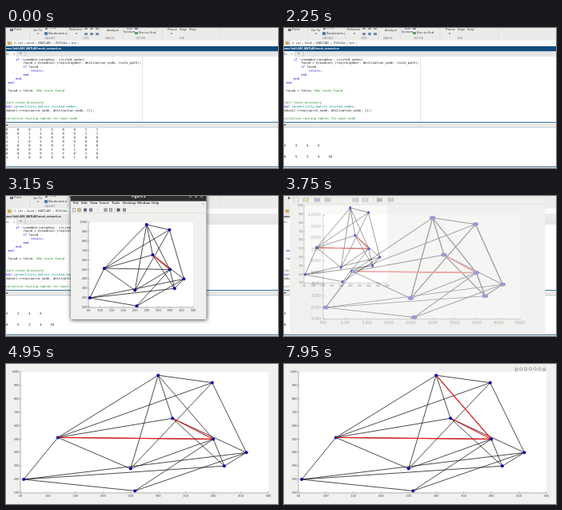
An HTML page with a canvas that plays this animation: 340x176 px, repeating every 8000 ms.

```html
<!DOCTYPE html>
<html lang="en">
<head>
<meta charset="utf-8">
<title>Mesh network plot</title>
<style>
html, body { margin: 0; width: 100%; height: 100%; overflow: hidden; background: #fff; }
canvas { display: block; width: 340px; height: 176px; }
</style>
</head>
<body>
<canvas id="stage"></canvas>
<script>
const LOOP = 8000;
const ratio = window.devicePixelRatio || 1;
const canvas = document.getElementById('stage');
const layer = document.createElement('canvas');
for (const c of [canvas, layer]) {
  c.width = 340 * ratio;
  c.height = 176 * ratio;
}
const stage = canvas.getContext('2d');
let ctx = stage;

const SANS = '"Open Sans", "Noto Sans", sans-serif';
const PLOT = '"Liberation Sans", Arial, sans-serif';
const MONO = '"DejaVu Sans Mono", monospace';

const nodes = {
  A: [118, 512], B: [300, 975], C: [398, 920], D: [326, 655], E: [400, 500],
  F: [460, 400], G: [420, 300], H: [250, 280], I: [56, 200], J: [258, 115]
};
const links = 'AB AC AD AE AH AI BC BD BE BH CF CH DF DG EG EH EJ FG FI FJ GI IJ'.split(' ');

// Moments of change, in ms
const at = { cleared: 450, result: 2000, figure: 2400, firstHop: 2900, secondHop: 3350,
  grow: 3650, grown: 3900, tools: 7000, thirdHop: 7250 };

const small = { x: 81, y: -4, w: 169.5, h: 159 };
const large = { x: -33, y: -31, w: 401, h: 214 };
const mix = (a, b, p) => a + (b - a) * p;

function rect(x, y, w, h, color) {
  ctx.fillStyle = color;
  ctx.fillRect(x, y, w, h);
}

function text(str, x, y, { size = 4, color = '#333', font = SANS, align = 'left', weight = '' } = {}) {
  ctx.font = `${weight} ${size}px ${font}`;
  ctx.fillStyle = color;
  ctx.textAlign = align;
  ctx.textBaseline = 'middle';
  ctx.fillText(str, x, y);
}

function line(x1, y1, x2, y2, color, width = 0.7) {
  ctx.strokeStyle = color;
  ctx.lineWidth = width;
  ctx.beginPath();
  ctx.moveTo(x1, y1);
  ctx.lineTo(x2, y2);
  ctx.stroke();
}

function dot(x, y, r, color) {
  ctx.fillStyle = color;
  ctx.beginPath();
  ctx.arc(x, y, r, 0, 7);
  ctx.fill();
}

function drawRibbon() {
  rect(0, 0, 340, 15, '#ebebea');
  const items = [['Print', 10, 2], ['Go To', 34, 2.5], ['Find', 54, -0.5], ['Bookmark', 53, 6.5],
    ['Refactor', 79, 1.5], ['Analyze', 126, 2.5], ['Run', 151, 1], ['Section', 147, 5],
    ['Run to End', 166, 6], ['Pause', 202, 1.5], ['Stop', 217, 1.5], ['Step', 229, 1.5]];
  for (const [label, x, y] of items) text(label, x, y, { size: 4.2 });
  const groups = [['NAVIGATE', 55], ['CODE', 100], ['ANALYZE', 130], ['SECTION', 168], ['RUN', 220]];
  for (const [label, x] of groups) text(label, x, 13, { size: 2.8, color: '#777', align: 'center' });
  for (const x of [30, 77, 118, 146, 195, 268]) line(x, 0, x, 14, '#cfcfcf', 0.5);
  rect(5, 1, 4, 3, '#6d757c');
  rect(49, -1, 3, 3, '#7d858c');
  rect(48, 5, 4, 4, '#4f7fb0');
  for (const x of [98, 105, 112]) {
    rect(x, 0, 4, 2, '#8ba889');
    rect(x, 6, 4, 3, '#6f8fab');
  }
  rect(161, 5, 4, 3, '#5f9b63');
  rect(161, -1, 4, 3, '#6f8fab');
  for (const x of [39, 74, 87, 206]) rect(x, 6.5, 2, 1, '#555');
}

function drawPath() {
  rect(0, 15, 340, 8, '#e8e8e8');
  rect(8, 15.5, 332, 7, '#fafafa');
  rect(2, 17, 4, 4, '#d7ab50');
  const crumbs = [['/', 10], ['usr', 15], ['local', 26], ['MATLAB', 40], ['R2024a', 62], ['bin', 82]];
  for (const [label, x] of crumbs) {
    text(label, x, 18.8, { size: 4.2 });
    text('▸', x - 2.5, 18.8, { size: 3, font: MONO, align: 'center' });
  }
  text('▸', 91, 18.8, { size: 3, font: MONO, align: 'center' });
}

const KEY = '#1515dd', REM = '#228b22', CODE = '#222';
// Each entry: row, column, then pairs of text and colour
const code = [
  [0, 8, 'if ', KEY, '~ismember(neighbor, visited_nodes)', CODE],
  [1, 12, 'found = broadcast_rreq(neighbor, destination_node, route_path);', CODE],
  [2, 12, 'if ', KEY, 'found', CODE],
  [3, 16, 'return', KEY, ';', CODE],
  [4, 12, 'end', KEY],
  [5, 8, 'end', KEY],
  [6, 4, 'end', KEY],
  [8, 4, 'found = false; ', CODE, '%No route found', REM],
  [9, 0, 'end', KEY],
  [11, 0, '% Start route discovery', REM],
  [12, 0, 'global ', KEY, 'connectivity_matrix visited_nodes;', '#087c87'],
  [13, 0, 'broadcast_rreq(source_node, destination_node, []);', CODE],
  [15, 0, '% Initialize routing tables for each node', REM]
];

function drawEditor(focused) {
  rect(0, 23, 340, 6.5, focused ? '#104a7b' : '#e9e9e9');
  text('ome/lab/LABS_MATLAB/mesh_network.m', 0, 26,
    { size: 3.35, color: focused ? '#fff' : '#333', weight: 'bold' });
  rect(0, 29.5, 340, 6.5, '#e6e6e6');
  rect(0, 29.5, 14, 6.5, '#fff');
  text('m', 0, 32.5, { size: 4 });
  text('×', 9, 32.5, { size: 4 });
  text('+', 17, 32.5, { size: 5 });
  line(14, 29.5, 14, 36, '#aaa', 0.5);
  line(24, 29.5, 24, 36, '#aaa', 0.5);
  line(170.5, 36, 170.5, 118, '#dcdcdc', 0.7);
  const step = 2.35;
  for (const [row, col, ...parts] of code) {
    let x = -6.8 + col * step;
    for (let i = 0; i < parts.length; i += 2) {
      text(parts[i], x, 39.5 + row * 4.96, { size: 3.9, font: MONO, color: parts[i + 1] });
      x += parts[i].length * step;
    }
  }
}

const matrix = ['000110011', '001100011', '111000000', '110100000',
  '100001100', '000010101', '000011010', '110000100'];

function row(values, y) {
  values.forEach((v, i) => text(v, i * 14.1 - (v.length - 1), y, { size: 3.9, font: MONO, color: '#222' }));
}

function drawConsole(t) {
  rect(0, 118, 340, 1, '#347aa8');
  rect(0, 119, 340, 6, '#e9e9e9');
  text('w', -1, 122, { size: 4, weight: 'bold' });
  line(0, 125, 340, 125, '#a5adb3', 0.6);
  if (t < at.cleared) matrix.forEach((bits, i) => row([...bits], 128 + i * 4.95));
  else row(['5', '3', '4', '5'], 148);
  if (t >= at.result) row(['0', '5', '2', '4', '10'], 162);
  rect(0, 174, 340, 1, '#486f87');
  rect(0, 175, 340, 1, '#e4e8eb');
}

function drawPlot(x, y, w, h, t) {
  const px = v => x + (v - 50) / 450 * w;
  const py = v => y + (1000 - v) / 900 * h;
  rect(x, y, w, h, '#fff');
  line(x, y, x, y + h, '#666', 0.5);
  line(x, y + h, x + w, y + h, '#666', 0.5);
  for (let v = 100; v <= 1000; v += 100) {
    line(x, py(v), x + 1.5, py(v), '#666', 0.5);
    text(v, x - 1.5, py(v), { font: PLOT, color: '#444', align: 'right' });
  }
  for (let v = 50; v <= 500; v += 50) {
    line(px(v), y + h, px(v), y + h - 1.5, '#666', 0.5);
    text(v, px(v), y + h + 4.3, { font: PLOT, color: '#444', align: 'center' });
  }
  const link = ([a, b], color, width) =>
    line(px(nodes[a][0]), py(nodes[a][1]), px(nodes[b][0]), py(nodes[b][1]), color, width);
  for (const pair of links) link(pair, '#111', 0.75);
  if (t >= at.firstHop) link('DE', '#e81a1a', 1.15);
  if (t >= at.secondHop) link('AE', '#e81a1a', 1.15);
  if (t >= at.thirdHop) link('BE', '#e81a1a', 1.15);
  for (const [a, b] of Object.values(nodes)) dot(px(a), py(b), 2, '#0505a8');
}

// Window drawn from its own top left corner
function drawWindow(w, h, t) {
  rect(0, 0, w, h, '#f0f0ee');
  rect(0, 0, w, 10.5, '#2d2d2d');
  text('Figure 2', w / 2, 5, { size: 4.5, color: '#eee', align: 'center', weight: 'bold' });
  for (const x of [20, 13, 6]) dot(w - x, 5, 1.4, '#777');
  const menus = [['File', 3], ['Edit', 13], ['View', 24], ['Insert', 36], ['Tools', 51],
    ['Desktop', 65], ['Window', 83], ['Help', 101]];
  for (const [label, x] of menus) text(label, x, 13.3, { size: 4.2, color: '#222', weight: 600 });
  text('»', w - 5, 13.5, { size: 4 });
  line(0, 17, w, 17, '#ddd', 0.5);
  const icons = ['#f8f8f8', '#e0b95c', '#5068a8', '#8a8f94', '#9aa3ab', '#b6bcc2', '#555', '#9a9a9a'];
  [4, 10.5, 18, 25, 43.5, 50, 59.5, 67].forEach((x, i) => {
    rect(x - 2, 19.5, 4, 4, '#666');
    rect(x - 1.5, 20, 3, 3, icons[i]);
  });
  for (const x of [34, 55]) line(x, 18.5, x, 24.5, '#bbb', 0.5);
  line(0, 25.5, w, 25.5, '#ccc', 0.5);
  drawPlot(22, 37, 131, 107, t);
}

function placeWindow(box, size, t) {
  ctx.save();
  ctx.translate(box.x, box.y);
  ctx.scale(box.w / size.w, box.h / size.h);
  drawWindow(size.w, size.h, t);
  ctx.restore();
}

function drawFigure(t) {
  ctx.save();
  ctx.shadowColor = 'rgba(0, 0, 0, .7)';
  ctx.shadowBlur = 5 * ratio;
  ctx.shadowOffsetY = ratio;
  rect(small.x, small.y, small.w, small.h, '#555');
  ctx.restore();
  placeWindow(small, small, t);
}

// The stretched old view fades as one layer over the resized window
function drawGrowth(t) {
  const k = (t - at.grow) / (at.grown - at.grow);
  const p = 1 - (1 - k) ** 2;
  const box = {};
  for (const side in small) box[side] = mix(small[side], large[side], p);
  placeWindow(box, large, t);

  ctx = layer.getContext('2d');
  ctx.setTransform(ratio, 0, 0, ratio, 0, 0);
  ctx.clearRect(0, 0, 340, 176);
  placeWindow(box, small, t);
  ctx = stage;
  ctx.save();
  ctx.globalAlpha = 1 - p;
  ctx.drawImage(layer, 0, 0, 340, 176);
  ctx.restore();
}

function drawTools() {
  ctx.strokeStyle = '#777';
  ctx.lineWidth = 0.6;
  for (let i = 0; i < 7; i++) {
    const x = 290.5 + i * 5.8;
    ctx.beginPath();
    if (i === 1 || i === 2) ctx.rect(x - 1.5, 4.8, 3, 3.2);
    else if (i === 0 || i === 6) {
      ctx.moveTo(x - 2, 6.5);
      ctx.lineTo(x, 4.3);
      ctx.lineTo(x + 2, 6.5);
      ctx.rect(x - 1.2, 6.5, 2.4, 2);
    } else {
      ctx.arc(x, 6, 1.6, 0, 7);
      ctx.moveTo(x + 1.2, 7.2);
      ctx.lineTo(x + 2.3, 8.6);
    }
    ctx.stroke();
  }
}

function draw(t) {
  ctx.setTransform(ratio, 0, 0, ratio, 0, 0);
  if (t >= at.grown) {
    rect(0, 0, 340, 176, '#f0f0ee');
    drawPlot(18, 10, 310, 152, t);
    if (t >= at.tools) drawTools();
    return;
  }
  rect(0, 0, 340, 176, '#fff');
  drawRibbon();
  drawPath();
  drawEditor(t < at.figure);
  drawConsole(t);
  if (t >= at.grow) drawGrowth(t);
  else if (t >= at.figure) drawFigure(t);
}

const start = performance.now();
function tick() {
  draw((performance.now() - start) % LOOP);
  requestAnimationFrame(tick);
}
tick();
</script>
</body>
</html>
```
